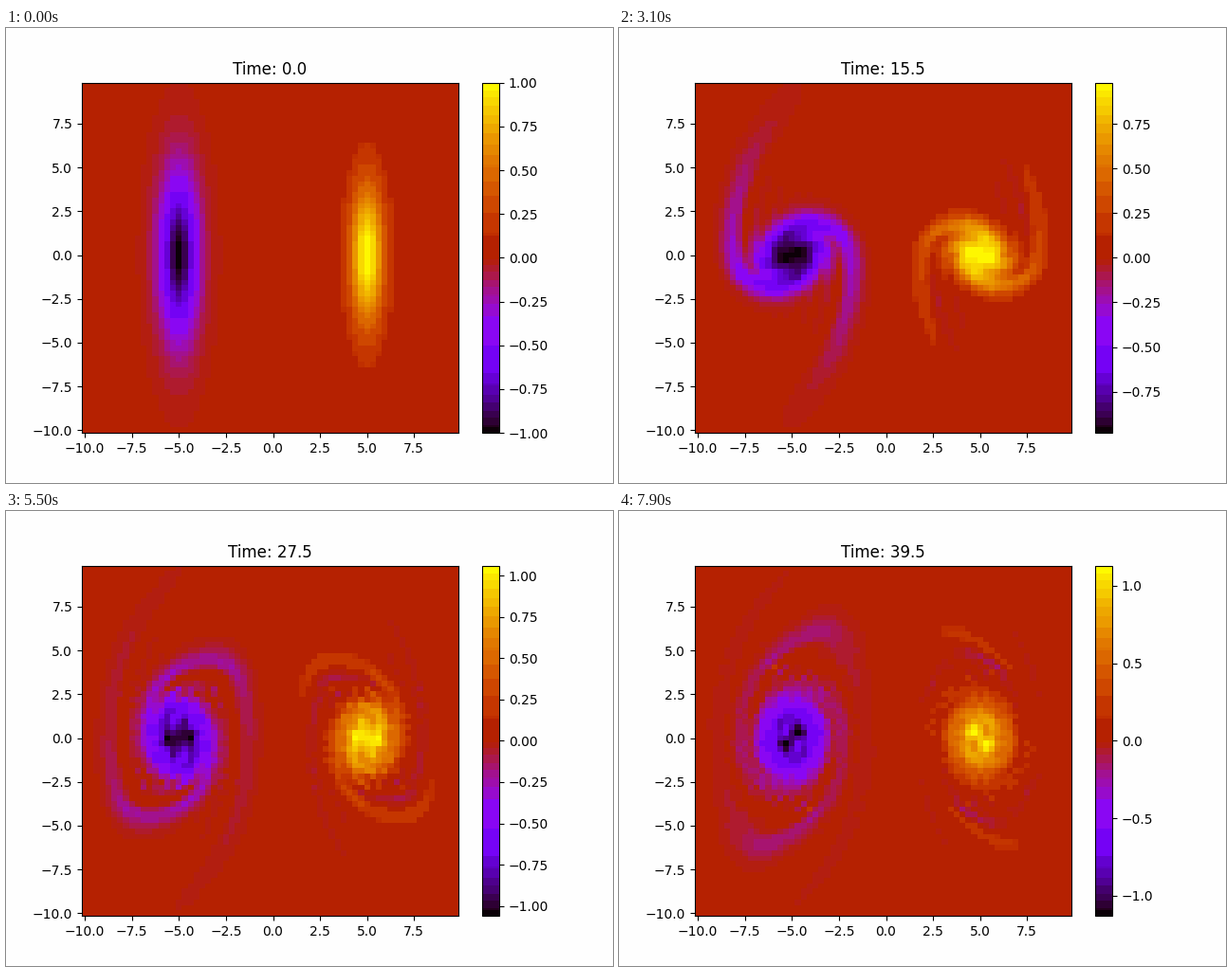
A matplotlib script for the animation above (8000 ms loop, 640x480 px).

```python
import numpy as np
import matplotlib.pyplot as plt
from matplotlib.animation import FuncAnimation
from matplotlib.colors import ListedColormap

N, L = 64, 20.0
NU = 0.001
FRAMES, STEP, SUB = 80, 0.5, 5   # frames, model time per frame, substeps
H = L / N

x = -L / 2 + H * np.arange(N)
X, Y = np.meshgrid(x, x)
k = 2 * np.pi * np.fft.fftfreq(N, H)
K2 = k[:, None] ** 2 + k[None, :] ** 2
K2[0, 0] = 1.0


def diff(a, axis):
    """Periodic central difference."""
    return (np.roll(a, -1, axis) - np.roll(a, 1, axis)) / (2 * H)


def laplacian(a):
    near = sum(np.roll(a, s, ax) for s in (1, -1) for ax in (0, 1))
    return (near - 4 * a) / H ** 2


def rhs(w):
    """Vorticity advection and diffusion."""
    wh = np.fft.fft2(w)
    wh[0, 0] = 0
    psi = np.real(np.fft.ifft2(-wh / K2))
    advect = diff(psi, 1) * diff(w, 0) - diff(psi, 0) * diff(w, 1)
    return advect + NU * laplacian(w)


def rk4(w, dt):
    k1 = rhs(w)
    k2 = rhs(w + dt / 2 * k1)
    k3 = rhs(w + dt / 2 * k2)
    k4 = rhs(w + dt * k3)
    return w + dt / 6 * (k1 + 2 * k2 + 2 * k3 + k4)


def blob(cx):
    return np.exp(-(X - cx) ** 2 - Y ** 2 / 20)


def simulate():
    w = blob(5) - blob(-5)
    states = [w]
    for _ in range(FRAMES - 1):
        for _ in range(SUB):
            w = rk4(w, STEP / SUB)
        states.append(w)
    return states


# Colour steps: shades sharing a coarse RGB cell merge into their mean.
RGB = np.rint(plt.get_cmap("gnuplot")(np.arange(256))[:, :3] * 255)
CELLS = (RGB // [32, 16, 32]).astype(int)
_, GROUP = np.unique(CELLS @ [256, 16, 1], return_inverse=True)
GROUP = GROUP.ravel()
MESH_PX, BAR_PX = 35.8, 26.7   # area of one grid cell and one bar shade


def banded_cmap(w):
    level = (w - w.min()) / (w.max() - w.min()) * 256
    idx = np.clip(level.astype(int), 0, 255).ravel()
    weight = BAR_PX + MESH_PX * np.bincount(idx, minlength=256)
    total = np.bincount(GROUP, weight)
    mean = [np.bincount(GROUP, weight * c) / total for c in RGB.T]
    return ListedColormap(np.transpose(mean)[GROUP] / 255)


states = simulate()

fig, ax = plt.subplots(figsize=(6.4, 4.8), dpi=100)
fig.set_facecolor((254 / 255,) * 3)
mesh = ax.pcolormesh(X, Y, states[0], shading="nearest",
                     cmap=banded_cmap(states[0]))
fig.colorbar(mesh, ax=ax)
title = ax.set_title("Time: 0.0")


def update(i):
    w = states[i]
    mesh.set_array(w)
    mesh.set_cmap(banded_cmap(w))
    mesh.set_clim(w.min(), w.max())
    title.set_text(f"Time: {i * STEP:.1f}")
    return mesh, title


anim = FuncAnimation(fig, update, frames=FRAMES, interval=100,
                     repeat=True, repeat_delay=0, blit=False)
plt.show()
```
